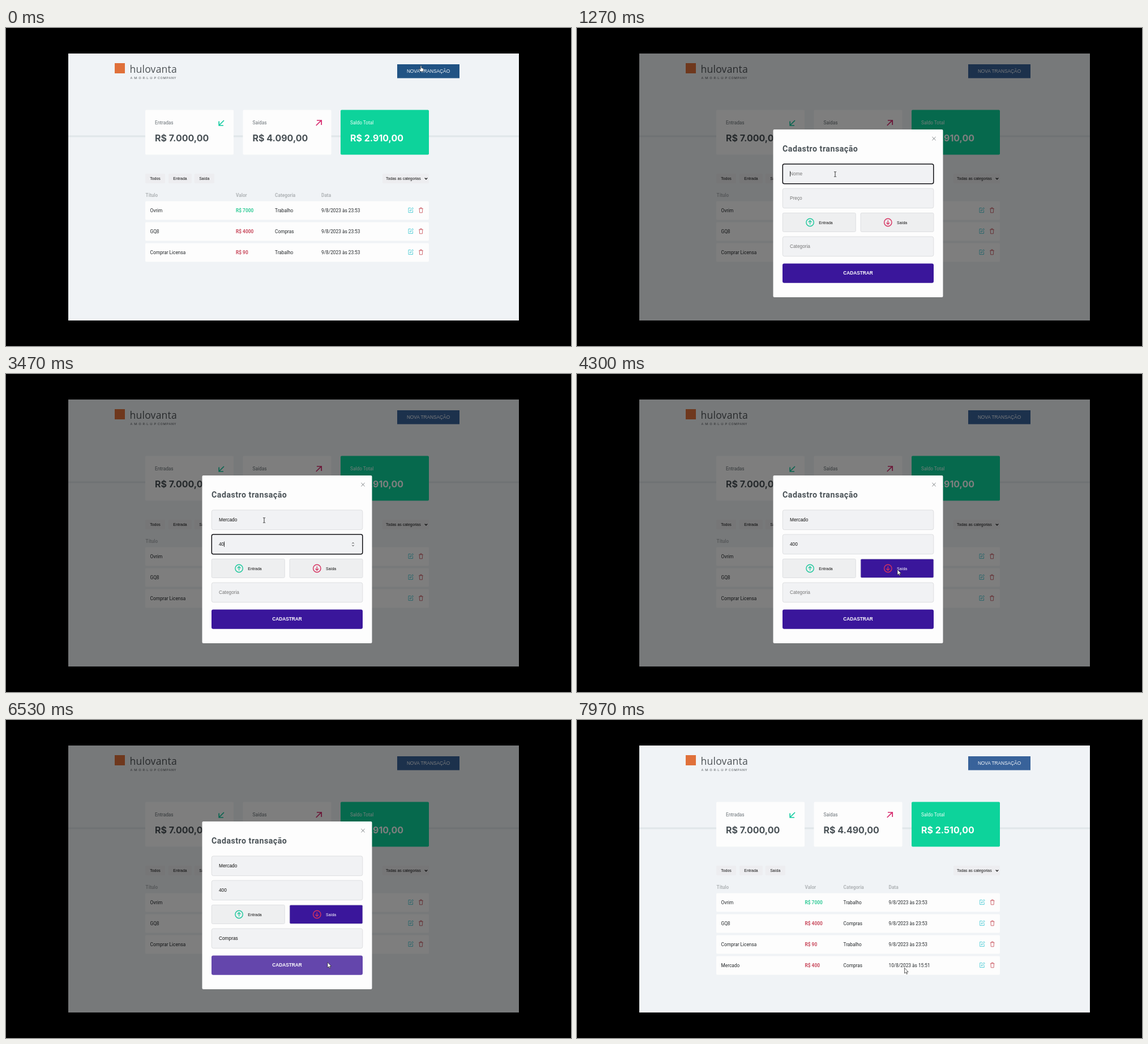
Animation, 998 px wide and 561 px high, one loop 8000 ms. Source, as an HTML page:

```html
<!DOCTYPE html>
<html lang="pt-BR">
<head>
<meta charset="utf-8">
<title>Controle de transações</title>
<style>
  html, body { margin: 0; width: 100%; height: 100%; overflow: hidden; background: #000; }
  svg { display: block; width: 100%; height: 100%; }
  text { font: 400 8.3px Roboto, sans-serif; white-space: pre; }
  .bold { font-weight: 700; }
  .amount { font: 700 16px Inter, sans-serif; }
  .title { font-size: 14.2px; font-weight: 700; letter-spacing: .5px; }
  .ui { font: 400 8.3px "Liberation Sans", Arial, sans-serif; }
  .small { font: 400 6.95px "Liberation Sans", Arial, sans-serif; }
  .strong { font-weight: 700; }
  .brand { font: 400 17.6px "Open Sans", sans-serif; letter-spacing: .2px; }
  .tag { font-size: 5.8px; letter-spacing: .8px; }
  .mid { text-anchor: middle; }
</style>
</head>
<body>
<svg id="stage" viewBox="0 0 998 561"></svg>
<script>
const LOOP = 8000, OPEN = 30, CLOSE = 6600;
const GREEN = '#0dd39b', RED = '#c94a5d', PURPLE = '#3a169b', INK = '#24282b';

const rect = (x, y, w, h, fill, extra = '') =>
  `<rect x="${x}" y="${y}" width="${w}" height="${h}" fill="${fill}" ${extra}/>`;
const text = (x, y, s, fill = INK, cls = '', id = '') =>
  `<text x="${x}" y="${y}" fill="${fill}" class="${cls}" id="${id}">${s}</text>`;
const line = (d, color, width, extra = '') =>
  `<path d="${d}" fill="none" stroke="${color}" stroke-width="${width}" ${extra}/>`;

// Dashboard
function card(x, label, amount, id, green) {
  return rect(x, 144.5, 156, 79, green ? GREEN : '#fdfdfd', 'rx="2"') +
    text(x + 17, 170, label, green ? '#effff9' : '#687075') +
    text(x + 17, 200, amount, green ? '#fff' : '#495156', 'amount', id);
}

function filterButton(x, w, label) {
  return rect(x, 257, w, 17, '#ededf0', 'rx="2"') + text(x + w / 2, 268, label, '#111', 'small mid');
}

function row(i, title, value, color, category, date, shift) {
  const y = 305.5 + 37 * i, base = y + 19.4, dx = shift ? .7 : 0;
  const [vx, cx, tx] = columns(shift);
  return rect(246, y, 501, 33, '#fdfdfd', 'rx="2"') +
    text(254.5, base, title) + text(vx, base, value, color, 'bold') +
    text(cx, base, category) + text(tx, base, date) +
    `<g transform="translate(${dx} ${y})">` +
    line('M715 12H711V20H718.5V16M713.5 17.5L714 15.3L718 11.3L719.5 12.7L715.6 16.8Z', '#3fc8d2', .85) +
    line('M729.3 13.2H736.7M731.6 13V11.5H734.4V13M730.2 13.2L730.6 20.3H735.4L735.8 13.2', '#cb5b64', .9) +
    '</g>';
}

const columns = shift => shift ? [402.5, 470.5, 550.5] : [406, 475, 557];

function table(shift) {
  const [vx, cx, tx] = columns(shift);
  const head = [[246.5, 'Título'], [vx, 'Valor'], [cx, 'Categoria'], [tx, 'Data']]
    .map(([x, s]) => text(x, 297.8, s, '#b0b4b7', 'bold')).join('');
  const rows = [
    ['Ovrim', 'R$ 7000', '#33cc98', 'Trabalho', '9/8/2023 às 23:53'],
    ['GQ8', 'R$ 4000', RED, 'Compras', '9/8/2023 às 23:53'],
    ['Comprar Licensa', 'R$ 90', RED, 'Trabalho', '9/8/2023 às 23:53']
  ];
  if (shift) rows.push(['Mercado', 'R$ 400', RED, 'Compras', '10/8/2023 às 15:51']);
  return head + rows.map((r, i) => row(i, ...r, shift)).join('');
}

function dashboard() {
  return rect(110, 45, 796, 471, '#f0f3f6') +
    rect(110, 189.5, 796, 3, '#e0e6e9') +
    rect(192, 62, 18, 18, '#e0703a') +
    text(218.5, 79, 'hulovanta', '#4d5256', 'brand') +
    text(219.5, 89.8, 'A M·O·R·L·U·P COMPANY', '#555a5d', 'tag') +
    rect(691, 64, 110, 24.5, '#38629a', 'id="newBtn"') +
    text(746, 78.6, 'NOVA TRANSAÇÃO', '#f4f7fa', 'ui mid') +
    card(246, 'Entradas', 'R$ 7.000,00', 'inSum') +
    card(418.5, 'Saídas', '', 'outSum') +
    card(591, 'Saldo Total', '', 'total', true) +
    line('M385 163L376.5 171.5M376.2 164.5V172H384', '#12cba0', 1.7) +
    line('M547.8 172L557 162.8M549 163H557.2V171', '#d6286c', 1.7) +
    filterButton(246, 35, 'Todos') + filterButton(287, 41, 'Entrada') + filterButton(332.5, 35.5, 'Saída') +
    rect(665, 257, 82, 17, '#ededf0', 'rx="2"') +
    text(671, 268, 'Todas as categorias', '#111', 'small') +
    line('M739.8 264.5L742 266.8L744.2 264.5', '#111', 1.2) +
    `<g id="before">${table(false)}</g><g id="after">${table(true)}</g>`;
}

// Form
const fields = [
  { id: 'name', y: 240, hint: 'Nome', value: 'Mercado', start: 1600, step: 150, from: 1050, to: 2950 },
  { id: 'price', y: 283, hint: 'Preço', value: '400', start: 3230, step: 180, from: 2950, to: 4300 },
  { id: 'kind', y: 368, hint: 'Categoria', value: 'Compras', start: 4930, step: 110, from: 4700, to: 6400 }
];

const field = f => rect(363.3, f.y, 266.5, 34.7, '#f1f2f4', `rx="3" id="${f.id}Box"`) +
  text(376, f.y + 20.2, f.hint, '#777', 'ui', f.id);

function typeButton(x, label, color, arrow, id) {
  return rect(x, 326.3, 129, 33.2, '#eeeff0', `rx="2" stroke="#d9dadd" stroke-width=".8" id="${id}"`) +
    `<circle cx="${x + 48.3}" cy="343" r="6.7" fill="none" stroke="${color}" stroke-width="1.4"/>` +
    line(`M${x + 48.3} 339.6V346.4${arrow}`, color, 1.3) +
    text(x + 64, 345.5, label, '#111', 'small', id + 'Label');
}

function modal() {
  return rect(110, 45, 796, 471, '#000', 'opacity=".5"') +
    rect(346.5, 179, 300, 296, '#fdfdfd', 'rx="2"') +
    line('M627.4 192L633.6 198.2M633.6 192L627.4 198.2', '#7d8285', 1) +
    text(363, 218.3, 'Cadastro transação', '#495156', 'title') +
    fields.map(field).join('') +
    line('M611.4 299.2L613 297.4L614.6 299.2M611.4 301.8L613 303.6L614.6 301.8', '#333', 1, 'id="spin"') +
    typeButton(363.3, 'Entrada', '#1bc79b', 'M408.6 342.6L411.6 339.6L414.6 342.6', 'inBtn') +
    typeButton(501, 'Saída', '#d6315f', 'M546.3 343.4L549.3 346.4L552.3 343.4', 'outBtn') +
    rect(363, 415.5, 267, 34.3, PURPLE, 'rx="3" id="submit"') +
    text(496.5, 435.2, 'CADASTRAR', '#fff', 'ui strong mid') +
    rect(0, 0, .8, 9.5, '#111', 'id="caret"');
}

const cursors =
  '<g id="mouse"><path id="arrow" d="M0 0V9.4L2.2 7.4L3.7 10.8L5.1 10.1L3.7 6.9H6.6Z" fill="#fff" stroke="#222" stroke-width=".7"/>' +
  line('M-2 -4.3H-.5L0 -3.7L.5 -4.3H2M0 -3.7V3.7M-2 4.3H-.5L0 3.7L.5 4.3H2', '#222', .9, 'id="beam"') +
  '<path id="hand" d="M-.8 1.2Q0 -.2 .8 1.2V4.5L4 5.4Q4.8 5.8 4.5 7L3.8 10.8H-1L-3.4 6.8Q-3.2 5.6 -2 6.4L-.8 7.4Z" fill="#fff" stroke="#333" stroke-width=".6"/></g>';

document.getElementById('stage').innerHTML =
  dashboard() + `<g id="modal">${modal()}</g>` + cursors;

const $ = id => document.getElementById(id);
const show = (id, on) => $(id).setAttribute('visibility', on ? 'inherit' : 'hidden');
const set = (id, attrs) => { for (const k in attrs) $(id).setAttribute(k, attrs[k]); };

const path = [
  [0, 733, 66], [350, 733, 66], [950, 456, 258], [3750, 456, 258],
  [4150, 566, 345], [4400, 566, 345], [4650, 563, 389.5], [5800, 563, 389.5],
  [6050, 568, 427.5], [6700, 568, 427.5], [7100, 578.5, 437.5], [LOOP, 578.5, 437.5]
];

function mouseAt(t) {
  const i = path.findIndex(p => p[0] > t);
  const [t0, x0, y0] = path[i - 1], [t1, x1, y1] = path[i];
  const k = (t - t0) / (t1 - t0), e = k * k * (3 - 2 * k);
  return [x0 + (x1 - x0) * e, y0 + (y1 - y0) * e];
}

function updateField(f, t) {
  const count = Math.max(0, Math.min(f.value.length, Math.floor((t - f.start) / f.step) + 1));
  const focused = t >= f.from && t < f.to;
  const label = $(f.id);
  label.textContent = count ? f.value.slice(0, count) : f.hint;
  set(f.id, { fill: count ? '#111' : '#777' });
  set(f.id + 'Box', { stroke: focused ? '#101014' : '#d7d8db', 'stroke-width': focused ? 1.5 : .8 });
  if (!focused) return false;
  const last = count ? f.start + f.step * (count - 1) : f.from;
  set('caret', { x: 376 + (count ? label.getComputedTextLength() : 0), y: f.y + 12.5 });
  return (t - last) % 1060 < 530;
}

function render(t) {
  const open = t >= OPEN && t < CLOSE, done = t >= CLOSE;
  const [x, y] = mouseAt(t);

  $('outSum').textContent = done ? 'R$ 4.490,00' : 'R$ 4.090,00';
  $('total').textContent = done ? 'R$ 2.510,00' : 'R$ 2.910,00';
  set('newBtn', { fill: t < 350 ? '#215384' : '#38629a' });
  show('before', !done);
  show('after', done);
  show('modal', open);

  const caret = fields.map(f => updateField(f, t)).some(Boolean);
  show('caret', caret);
  show('spin', t >= fields[1].from && t < fields[1].to);
  const chosen = t >= 4300;
  set('outBtn', { fill: chosen ? PURPLE : '#eeeff0' });
  set('outBtnLabel', { fill: chosen ? '#fff' : '#111' });
  set('submit', { fill: y > 415.5 ? '#6446ac' : PURPLE });

  const overField = open && x > 363 && x < 630 && fields.some(f => y > f.y && y < f.y + 35);
  show('hand', t < OPEN);
  show('beam', overField);
  show('arrow', t >= OPEN && !overField);
  set('mouse', { transform: `translate(${x} ${y})` });
}

function tick() {
  render(performance.now() % LOOP);
  requestAnimationFrame(tick);
}
tick();
</script>
</body>
</html>
```
